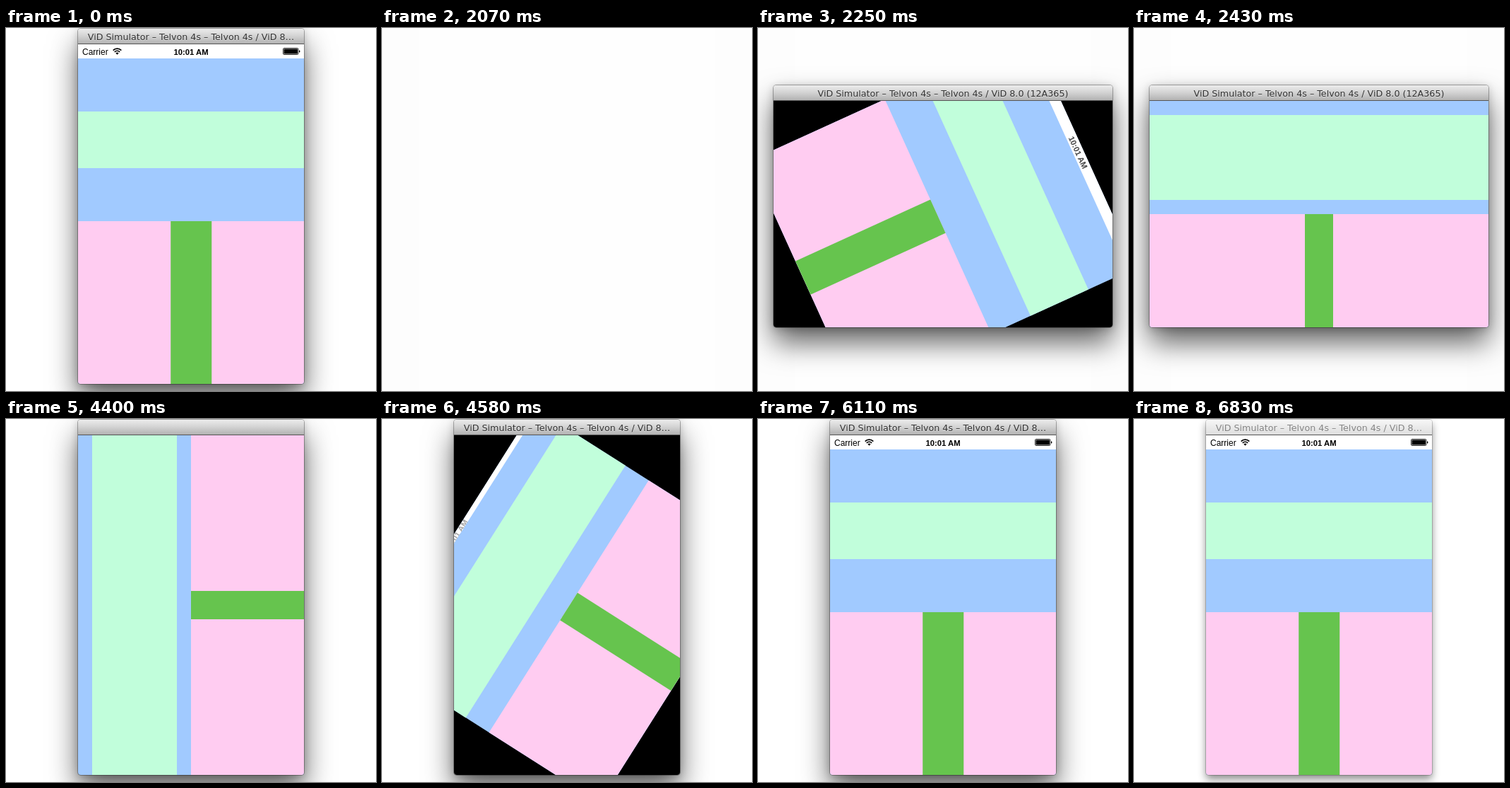
An HTML page for the animation above (6900 ms loop, 524 px wide and 513 px high).

```html
<!DOCTYPE html>
<html lang="en">
<head>
<meta charset="utf-8">
<title>Rotating layout</title>
<style>
/* land: window is landscape, lay: layout progress towards landscape,
   label: title shown, idle: window inactive, show: window visible */
@property --land { syntax: "<number>"; inherits: true; initial-value: 0; }
@property --lay { syntax: "<number>"; inherits: true; initial-value: 0; }
@property --label { syntax: "<number>"; inherits: true; initial-value: 1; }
@property --idle { syntax: "<number>"; inherits: true; initial-value: 0; }
@property --show { syntax: "<number>"; inherits: true; initial-value: 1; }

html, body { margin: 0; width: 100%; height: 100%; overflow: hidden; background: #fff; }

.stage {
  position: relative; width: 524px; height: 513px; overflow: hidden;
  animation: turn 6900ms step-end infinite;
}
.stage::before {
  content: ""; position: absolute; inset: 0;
  background: linear-gradient(90deg, #fdfdfd 52px, #fefefe 52px 472px, #fdfdfd 472px);
  opacity: max(var(--land), 1 - var(--show));
}

@keyframes turn {
  0%      { --land: 0; --lay: 0;   --label: 1; --idle: 0; --show: 1; }
  29.999% { --land: 0; --lay: 0;   --label: 0; --idle: 0; --show: 0; }
  31.304% { --land: 1; --lay: 0;   --label: 0; --idle: 0; --show: 1; }
  32.608% { --land: 1; --lay: .272; --label: 1; --idle: 0; --show: 1; }
  33.913% { --land: 1; --lay: .74; --label: 1; --idle: 0; --show: 1; }
  35.217% { --land: 1; --lay: 1;   --label: 1; --idle: 0; --show: 1; }
  63.768% { --land: 0; --lay: 1;   --label: 0; --idle: 0; --show: 1; }
  65.072% { --land: 0; --lay: .96; --label: 1; --idle: 0; --show: 1; }
  66.376% { --land: 0; --lay: .64; --label: 1; --idle: 0; --show: 1; }
  67.681% { --land: 0; --lay: .18; --label: 1; --idle: 0; --show: 1; }
  68.985% { --land: 0; --lay: 0;   --label: 1; --idle: 0; --show: 1; }
  98.985%, 100% { --land: 0; --lay: 0; --label: 1; --idle: 1; --show: 1; }
}

.window {
  position: absolute;
  left: calc(102px - 80px * var(--land));
  top: calc(1px + 80px * var(--land));
  width: calc(320px + 160px * var(--land));
  height: calc(502px - 160px * var(--land));
  opacity: var(--show);
}
.shadow { position: absolute; inset: 0; border-radius: 4px; }
.active {
  opacity: calc(1 - var(--idle));
  box-shadow: 0 0 0 1px rgba(0,0,0,.3), 0 2px 12px rgba(0,0,0,.2), 0 21.5px 40px rgba(0,0,0,.62);
}
.inactive {
  opacity: var(--idle);
  box-shadow: 0 0 0 1px rgba(0,0,0,.2), 0 6px 12px rgba(0,0,0,.45);
}

.bar {
  position: absolute; left: 0; right: 0; top: 0; height: 22px;
  box-sizing: border-box; overflow: hidden;
  border-bottom: 1px solid #555; border-radius: 4px 4px 0 0;
  background: linear-gradient(#ececec, #d2d2d2 50%, #b2b2b2);
  font: 12.7px/22px "DejaVu Sans", sans-serif; color: #333;
  text-align: center; white-space: nowrap;
  text-shadow: 0 1px rgba(255,255,255,.45);
}
.bar::before {
  content: ""; position: absolute; inset: 0 0 -1px;
  background: linear-gradient(#f7f7f7, #dedede 21px, #999 21px);
  opacity: var(--idle);
}
.bar span { position: absolute; left: 0; right: 0; top: 1px; }
.short { opacity: calc((1 - var(--land)) * var(--label) * (1 - .45 * var(--idle))); }
.long { opacity: calc(var(--land) * var(--label)); }

.screen {
  position: absolute; left: 0; right: 0; top: 22px; bottom: 0;
  overflow: hidden; background: #000; border-radius: 0 0 4px 4px;
}
.view {
  position: absolute; left: 50%; top: 50%;
  width: calc(320px + 160px * var(--lay));
  height: calc(480px - 160px * var(--lay));
  transform: translate(-50%, -50%) rotate(calc(90deg * (var(--land) - var(--lay))));
  background: #a1caff;
}
.status {
  position: relative; height: calc(20px * (1 - var(--lay)));
  overflow: hidden; background: #fff;
}
.status > * {
  position: absolute; top: 50%; transform: translateY(-50%);
  opacity: calc(1 - var(--lay));
  font: 12px/20px "Liberation Sans", Arial, sans-serif; color: #000;
}
.carrier { left: 6px; margin-top: .5px; }
.wifi { left: 49px; }
.clock { left: 0; right: 0; margin-top: .5px; text-align: center; }
.status .clock { font-weight: bold; font-size: 11.3px; }
.battery { right: 5px; }

.mint, .pink, .green { position: absolute; }
.mint {
  left: 0; right: 0; background: #c1fedb;
  top: calc(95px - 75px * var(--lay));
  height: calc(80px + 40px * var(--lay));
}
.pink {
  left: 0; right: 0; bottom: 0; background: #ffccf1;
  height: calc(230px - 70px * var(--lay));
}
.green {
  top: 0; bottom: 0; left: 50%; background: #66c44e;
  width: calc(57.5px - 17.5px * var(--lay));
  transform: translateX(-50%);
}
</style>
</head>
<body>
<div class="stage">
  <div class="window">
    <div class="shadow active"></div>
    <div class="shadow inactive"></div>
    <div class="bar">
      <span class="short">ViD Simulator – Telvon 4s – Telvon 4s / ViD 8…</span>
      <span class="long">ViD Simulator – Telvon 4s – Telvon 4s / ViD 8.0 (12A365)</span>
    </div>
    <div class="screen">
      <div class="view">
        <div class="status">
          <div class="carrier">Carrier</div>
          <svg class="wifi" width="13" height="10" viewBox="0 0 13 10" fill="none" stroke="#000" stroke-width="1.7">
            <path d="M.7 3.6a8.2 8.2 0 0 1 11.6 0M2.8 5.8a5.2 5.2 0 0 1 7.4 0"/>
            <path d="M6.5 9.7 4.4 7.5a3 3 0 0 1 4.2 0z" fill="#000" stroke="none"/>
          </svg>
          <div class="clock">10:01 AM</div>
          <svg class="battery" width="25" height="10" viewBox="0 0 25 10">
            <rect x=".5" y=".5" width="21.5" height="9" rx="1.5" fill="none" stroke="#000" stroke-width=".8"/>
            <rect x="1.5" y="1.5" width="19.5" height="7" rx=".6"/>
            <path d="M23 3.2q1.5.5 1.5 1.8T23 6.8z"/>
          </svg>
        </div>
        <div class="mint"></div>
        <div class="pink"><div class="green"></div></div>
      </div>
    </div>
  </div>
</div>
</body>
</html>
```
